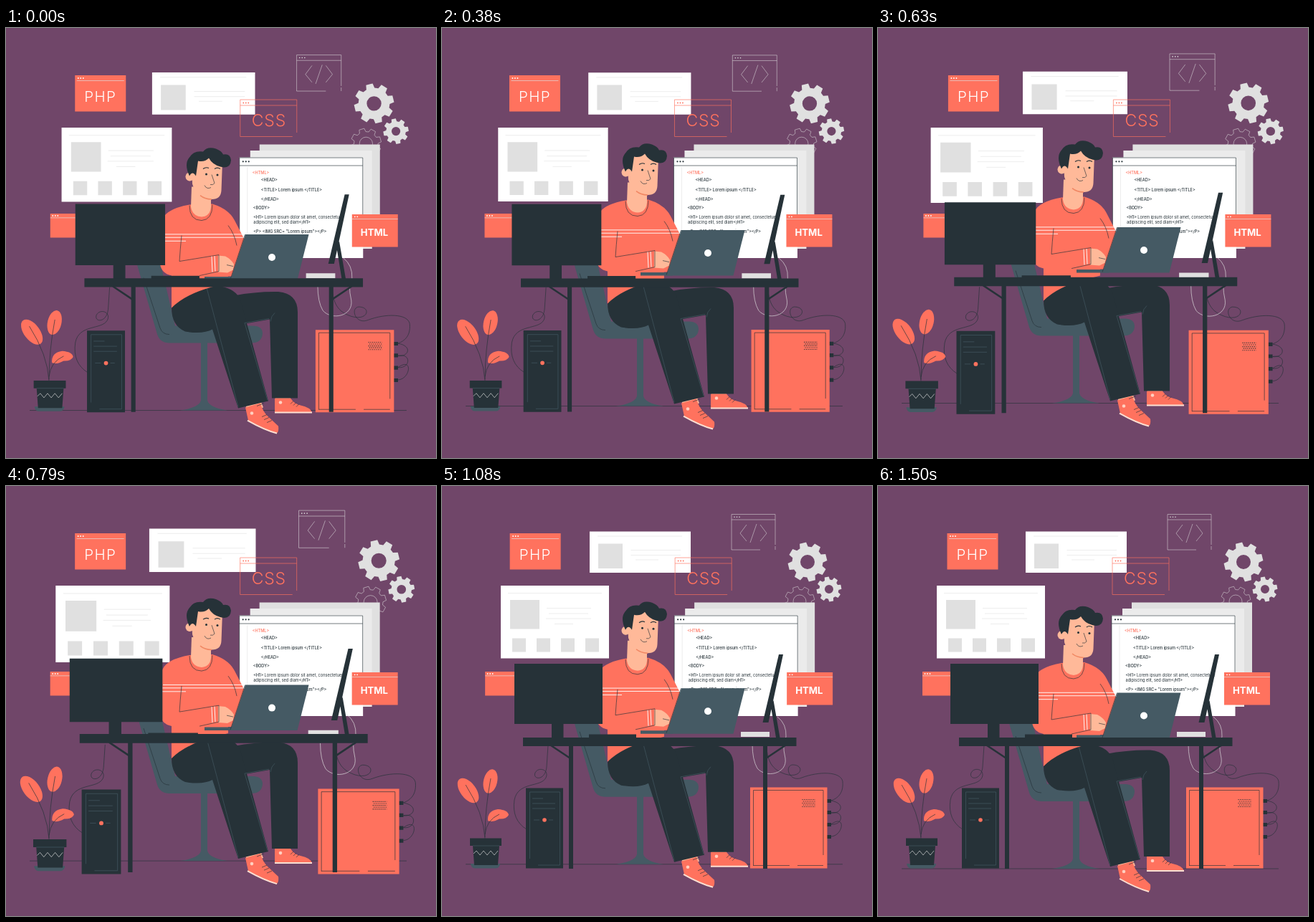
These frames come from a looping animation (600 by 600 pixels, 1.54 s). An HTML page:

```html
<!DOCTYPE html>
<html lang="en">
<head>
<meta charset="utf-8">
<title>Web developer at work</title>
<style>
  html, body { margin: 0; width: 100%; height: 100%; overflow: hidden; background: #704669; }
  svg { display: block; width: 100vw; height: 100vh; font-family: Inter, "Open Sans", sans-serif; }
  .dark { fill: #263238; }
  .slate { fill: #455a64; }
  .coral { fill: #ff725e; }
  .skin { fill: #ffb999; }
  .white { fill: #fff; }
  .gray { fill: #e0e0e0; }
  .ink, .pale, .rule, .seam, .coralLine { fill: none; stroke-width: .65; }
  .ink { stroke: #263238; }
  .pale { stroke: #e0e0e0; }
  .rule { stroke: #e4e4e4; }
  .seam { stroke: #455a64; }
  .coralLine { stroke: #ff725e; }
  .dots { fill: none; stroke-width: 1.8; stroke-linecap: round; stroke-dasharray: 0 3.5; }
  .code { font-size: 5.6px; font-weight: 500; fill: #263238; }
  .plain { font-weight: 400; }
</style>
</head>
<body>
<svg viewBox="0 0 600 600">
  <g id="screens">
    <path class="white" d="M206 63.5H347V121H206Z M82 139H233V240.500H82Z"/>
    <path class="gray" d="M218 80.500h34V115h-34Z M95 159h41v40.500H95Z M98 212.500h19v19H98Z M132 212.500h19v19h-19Z M166 212.500h19v19h-19Z M200 212.500h19v19h-19Z"/>
    <path class="rule" d="M217 70H335 M263.500 89.500H333 M263.500 96.500H333 M270 103H302 M92 149.500H223 M146 170.500H208 M149 178H204 M145 185H208 M157 192.500H183"/>
    <path class="pale" opacity=".8" d="M444 89H404V39.500H465V82 M404 47H465 M425 54L416 66L425 77 M439 53L430 79 M444 54L453 66L444 77 M465 84V89"/>
    <path class="pale dots" style="stroke-width:1.6" d="M408 43.300H416"/>
    <path id="gearA" class="gray" fill-rule="evenodd"/>
    <path id="gearB" class="gray" fill-rule="evenodd"/>
    <path id="gearC" class="pale" opacity=".8"/>
  </g>

  <g id="cards">
    <path class="gray" d="M354 162.500H522V298H354Z"/>
    <path fill="#ebebeb" d="M341 171H511V308H341Z"/>
    <path class="white" d="M326 180.500H498.500V321H326Z"/>
    <path class="ink" d="M326 320V181H498V262 M326 192H498"/>
    <path class="rule" d="M337 194V300"/>
    <path class="ink dots" style="stroke-width:2.2;stroke-dasharray:0 4" d="M331 186.300H340"/>
    <g class="code">
      <text x="344" y="204" class="coral">&lt;HTML&gt;</text>
      <text x="356" y="214.300">&lt;HEAD&gt;</text>
      <text x="356" y="228">&lt;TITLE&gt; Lorem ipsum &lt;/TITLE&gt;</text>
      <text x="356" y="241">&lt;/HEAD&gt;</text>
      <text x="345" y="253">&lt;BODY&gt;</text>
      <text x="345.500" y="266">&lt;H1&gt; <tspan class="plain">Lorem ipsum dolor sit amet, consectetuer</tspan></text>
      <text x="345.500" y="273"><tspan class="plain">adipiscing elit, sed diam</tspan>&lt;/H1&gt;</text>
      <text x="345.500" y="286">&lt;P&gt; &lt;IMG SRC= "Lorem ipsum"&gt;&lt;/P&gt;</text>
    </g>
    <path class="coral" d="M96.500 66h71v50.500h-71Z M483 260h64v45.500h-64Z M62 259h66v33.500H62Z"/>
    <path class="pale" d="M99 73.500H165 M483 266.500H547 M62 264.800H128"/>
    <path class="dots" stroke="#fff" d="M101 70H109 M487 263.300H494 M65.500 262H73"/>
    <path class="coralLine" d="M400 151.500H327V100H406V146 M327 108H406"/>
    <path class="coralLine dots" style="stroke-width:1.8" d="M331.500 104.500H339"/>
    <text x="109.500" y="103.300" font-size="20.500" font-weight="300" letter-spacing="1.400" class="white">PHP</text>
    <text x="343" y="137.300" font-size="23" font-weight="300" letter-spacing=".8" class="coral">CSS</text>
    <text x="495" y="290" font-size="13.200" font-weight="700" class="white">HTML</text>
  </g>

  <g id="person">
    <path class="ink" d="M33 534H559"/>
    <path class="slate" d="M183 331H216L236 416H346Q358 417 358 427Q357 440 342 440H228Q215 440 211 428Z M272 438H281V520Q283 530 309 534H243Q270 530 272 520Z"/>
    <path class="ink" d="M192 349L215 419Q218 428 228 428"/>

    <path class="skin" d="M376 510H397V522H376Z M332 522L354 517L359 530L338 536Z"/>
    <path class="coral" d="M375 517L397 517Q402 525 411 527Q425 530 427 537H375Z"/>
    <path class="coral" d="M334 530L355 524Q358 535 365 542L380 556Q381 563 378 566Q368 564 338 548Z"/>
    <path fill="none" stroke="#ffe0d2" stroke-width="2" d="M375 537H427 M337 548Q360 561 378 566"/>
    <path class="ink" d="M397 525L401 521 M401 527L405 523 M405 529L409 525 M357 543L364 540 M360 547L367 544 M364 551L371 548 M350 528L360 524"/>
    <circle cx="383" cy="523" r="2.300" fill="#ffd0c0"/>
    <circle cx="343" cy="538" r="2.300" fill="#ffd0c0"/>

    <path class="dark" d="M318 374Q348 368 380 368.500Q407 371 407 397V517H371L368 407L300 419Z"/>
    <path class="dark" d="M231 391Q236 378 262 364L280 361H300Q321 365 327 380L366 521L324 531L288 421Q275 428 250 424Q231 416 231 391Z"/>
    <path class="seam" d="M280 363L324 529 M333 412L365 520 M333 412L367 406 M369 410Q370 402 375 398"/>

    <path class="coral" d="M218 268Q223 253 256 247L288 246Q311 253 319 269L334 298L326 347H310V356L287 362Q250 372 231 391V346Q217 343 215 330Z"/>
    <path fill="none" stroke="#fff" stroke-width=".9" d="M219 288.300H330 M218 292.700H332 M217 297.700H251"/>
    <path class="ink" d="M245 290Q243 310 242 326L297 317 M310 276Q319 288 322 304"/>
    <path class="skin" d="M259 222H286V250Q285 263 273 264Q260 263 258 250Z"/>
    <path class="ink" d="M256 248Q256 269 273 269Q288 268 288 247"/>

    <circle cx="256.500" cy="208" r="6" class="skin"/>
    <path class="skin" d="M259 187Q280 171 302 187L300.500 227Q300 239.500 287 239.500Q266 240 260 218Z"/>
    <path fill="none" stroke="#f08763" stroke-width="1.500" d="M271 234Q277 239 287 239.500"/>
    <path class="dark" d="M256 207Q248 190 256 181Q262 171 275 173Q281 165 293 169Q301 172 303 177Q313 175 314 185Q313 198 299 194Q288 191 283 182Q277 188 268 186L265 207Q260 199 256 207Z"/>
    <path class="ink" style="stroke-width:1.200" d="M275 197Q279 194 283 196 M291 197Q295 194 299 197"/>
    <path class="ink" d="M287 205L291 217Q289 220 285 219 M277 220Q280 226 286 223"/>
    <circle cx="279.500" cy="204.500" r="1.500" class="dark"/>
    <circle cx="295" cy="205.500" r="1.500" class="dark"/>

    <path class="skin" d="M296 318L306 319Q314 323 318 330L317 338L309 342L296 341Z"/>
    <path class="ink" d="M297 317V340L270 346 M308 331L317 333"/>
    <path fill="none" stroke="#fff" stroke-width=".9" d="M287 319L288 341 M291 318.500L292 340"/>
    <path class="slate" d="M277 347.500H322V352H277Z"/>
    <path class="slate" d="M334 288.500H422.500L406.500 352H313Z"/>
    <path class="ink" d="M333.500 288.500L313 351"/>
    <circle cx="371" cy="320.500" r="5" class="white"/>
  </g>

  <g id="devices">
    <path class="ink" d="M148 362L146 392C144 412 126 410 130 400C135 391 150 396 145 407C138 421 106 412 101 438Q97 466 118 479"/>
    <path class="ink" d="M453 366C455 392 468 398 479 402C502 409 507 389 489 389C477 391 485 414 502 407C526 398 556 398 559 412C561 432 548 437 543 439"/>
    <path class="ink" d="M543 439C564 443 557 458 543 456C562 452 560 474 543 472C564 457 560 488 543 489"/>
    <path class="pale" d="M468 322Q481 332 480 350Q474 358 479 380C482 402 452 408 440 394Q433 382 433 360"/>
    <path class="dark" d="M101 248H224V332H169.500V351H153V332H101Z M205 346.500H271V351H205Z M117 421.500H169V533.500H117Z"/>
    <path class="seam" d="M122.500 520V427H164.500V529H134 M126 436H141 M126 443H158 M126 450H158 M128 466H136 M149 466H155"/>
    <circle cx="143" cy="466" r="2.800" class="coral"/>
    <path class="dark" d="M537 437h6v5h-6Z M537 453h6v5h-6Z M537 470h6v5h-6Z M537 487h6v5h-6Z"/>
    <path class="coral" d="M430 420.500H537.500V533.500H430Z"/>
    <path class="ink" d="M434.500 530V424.500H532V515 M434.500 529.500H485 M496 529.500H532"/>
    <path class="ink" style="stroke-width:1.100;stroke-dasharray:1.100 1.500" d="M502.500 437.500H521 M503.800 440H521 M502.500 442.500H521 M503.800 445H521 M502.500 447.500H521"/>
    <path class="dark" d="M470 235H476L455.500 330H447.500Z M459 308L462.500 299L471.500 351H466Z"/>
    <path class="gray" d="M417 343H457V350H417Z"/>
  </g>

  <g id="desk">
    <path class="dark" d="M113 351H494.500V363H113Z M177 362H183V534H177Z M448 362H454V534H448Z"/>
    <path fill="none" stroke="#263238" stroke-width="2.500" d="M152 362L179 380 M479 362L452 380"/>
  </g>

  <g id="plant">
    <ellipse cx="36.500" cy="425" rx="10.800" ry="20" transform="rotate(-37 36.500 425)" class="coral"/>
    <ellipse cx="67.500" cy="412" rx="9.500" ry="17" transform="rotate(13 67.500 412)" class="coral"/>
    <path class="coral" d="M64 467Q63 453 78 451Q92 452 93 459Q90 465 80 464.500Q70 470 64 467Z"/>
    <path class="ink" d="M60 492Q58 456 33 417 M60 490Q60 450 68 408 M60 486Q62 466 80 458"/>
    <path class="slate" d="M40 527H81Q80 533.500 75 533.500H46Q41 533.500 40 527Z"/>
    <path class="dark" d="M39 491.500H83V502H80L78 529H45L43 502H39Z"/>
    <path class="pale" d="M44 513L48 509L53 515L58 509L63 515L68 509L73 515L78 509"/>
    <path class="seam" d="M43 502H80"/>
  </g>
</svg>
<script>
  const $ = id => document.getElementById(id);

  function gear(id, cx, cy, outer, root, hole, turn) {
    const points = [], teeth = 8;
    const add = (r, a) => points.push(`${cx + r * Math.cos(a)} ${cy + r * Math.sin(a)}`);
    for (let i = 0; i < teeth; i++) {
      const a = turn + i * 2 * Math.PI / teeth;
      add(root, a - .27);
      add(outer, a - .17);
      add(outer, a + .17);
      add(root, a + .27);
    }
    const ring = `M${cx - hole} ${cy}a${hole} ${hole} 0 1 0 ${2 * hole} 0a${hole} ${hole} 0 1 0 ${-2 * hole} 0Z`;
    $(id).setAttribute("d", `M${points.join("L")}Z${ring}`);
  }
  gear("gearA", 510, 106, 27.5, 21.5, 10, -.24);
  gear("gearB", 540, 144, 17.5, 13.5, 6, -.19);
  gear("gearC", 499, 161, 21, 16.5, 9, -.29);

  // Values at every tenth of the cycle, linear in between.
  const SHAKE = [0, -1, 2, -4, 4, -4, 4, -4, 2, -1, 0];
  const BEAT = [1, 1.1, 1.05, 1, 1, 1.1, 1, 1, 1, 1, 1];
  const CENTERS = { screens: [319.5, 140], devices: [329.5, 384], desk: [304, 442.5], plant: [57.5, 465] };
  const UNIT = 1.2, LOOP = 1540, CYCLE = 1500, LEAD = 28, FPS = 24;

  function sample(values, p) {
    const i = Math.min(Math.floor(p * 10), 9);
    return values[i] + (values[i + 1] - values[i]) * (p * 10 - i);
  }

  const move = (id, value) => $(id).setAttribute("transform", value);

  function draw() {
    const t = performance.now() % LOOP;
    const step = Math.min(Math.floor(t * FPS / 1000 + .1), 36);
    const p = Math.min(step * 1000 / FPS + LEAD, CYCLE) / CYCLE;
    const scale = sample(BEAT, p);
    for (const [id, [x, y]] of Object.entries(CENTERS))
      move(id, `translate(${x} ${y}) scale(${scale}) translate(${-x} ${-y})`);
    move("cards", `translate(${UNIT * sample(SHAKE, p)} 0)`);
    move("person", `translate(0 ${-UNIT * 10 * (1 - Math.abs(2 * p - 1))})`);
    requestAnimationFrame(draw);
  }
  draw();
</script>
</body>
</html>
```
